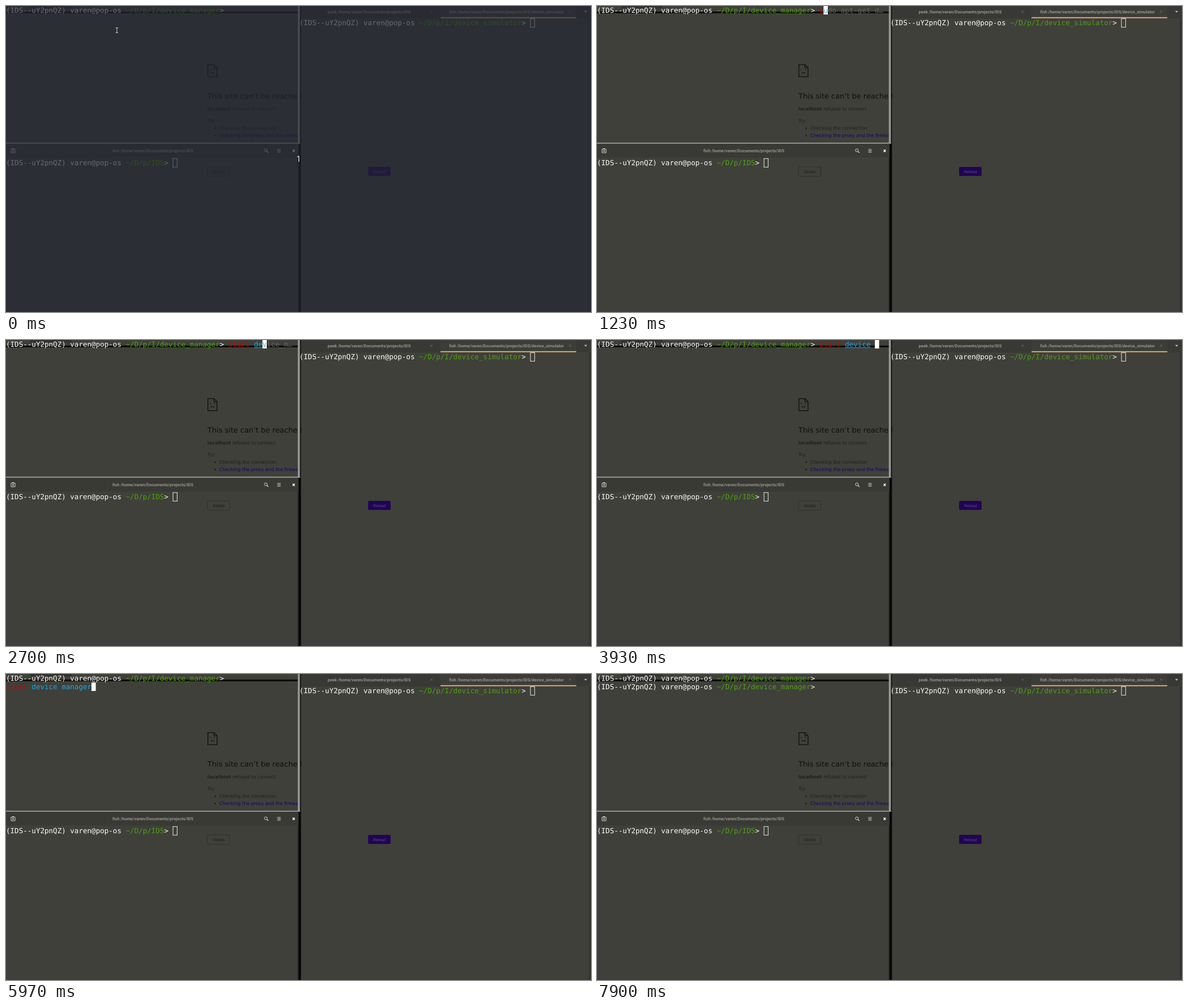
Write an HTML page that moves like this. It is 1034 px wide and 542 px high and loops after 8 s.

```html
<!DOCTYPE html>
<html lang="en">
<head>
<meta charset="utf-8">
<title>Terminals</title>
<style>
  html, body { margin: 0; width: 100%; height: 100%; overflow: hidden; background: #3f403a; }
  svg { display: block; width: 1034px; height: 542px; }
  text { white-space: pre; text-rendering: geometricPrecision; }
  .mono { font: 12.55px "DejaVu Sans Mono", monospace; fill: #fafaf7; }
  .title { font: bold 7.48px Roboto, sans-serif; fill: #95958b; }
  .page { font: 8.14px "DejaVu Sans", sans-serif; fill: #1f1f1c; }
  .button { font: 6.95px "Liberation Sans", sans-serif; }
  .line { fill: none; stroke: #d8d8d2; stroke-width: 1; }
</style>
</head>
<body>
<svg viewBox="0 0 1034 542">
  <defs>
    <clipPath id="paneClip"><rect width="515.5" height="542"/></clipPath>
  </defs>
  <rect width="1034" height="542" fill="#3f403a"/>

  <!-- page showing through the terminals -->
  <rect y="9.8" width="516" height="3.2" fill="#0c0c0b"/>
  <rect x="42" width="74" height="4.5" fill="#32332f"/>
  <g fill="none" stroke="#161614" stroke-width="1.6">
    <path d="M356.8 103.8H367.5L373 109.3V125.2H356.8Z"/>
    <path d="M367.5 103.8V109.3H373" stroke-width="1.3"/>
    <path d="M361.8 119.6Q365 115.8 368.2 119.6" stroke-width="1.3"/>
    <path d="M360.6 111.5V113.2M368.6 111.5V113.2"/>
  </g>
  <text class="page" x="356" y="164" style="font-size:12.95px;fill:#0f0f0d">This site can’t be reached</text>
  <g class="page" clip-path="url(#paneClip)">
    <text x="356" y="185.2"><tspan font-weight="bold">localhost</tspan> refused to connect.</text>
    <text x="356" y="206.2">Try:</text>
    <circle cx="369.5" cy="216.4" r="1.5"/>
    <text x="377" y="219.2">Checking the connection</text>
    <circle cx="369.5" cy="229.4" r="1.5"/>
    <text x="377" y="232.2" fill="#12006a">Checking the proxy and the firewall</text>
  </g>
  <rect x="356" y="285" width="39.6" height="16.6" rx="2" fill="none" stroke="#2c2d29" stroke-width=".8"/>
  <text class="button" x="376" y="296" text-anchor="middle" fill="#1b1b19">Details</text>
  <rect x="640" y="285" width="39.8" height="16" rx="2" fill="#210455"/>
  <text class="button" x="660" y="295.6" text-anchor="middle" fill="#5d4f80">Reload</text>

  <!-- right window -->
  <rect x="521" width="513" height="22" fill="#383934"/>
  <rect x="768" width="240" height="20" fill="#3c3d38"/>
  <rect x="768" y="19.8" width="240" height="1.8" fill="#f3b180"/>
  <rect x="1029.8" y="22" width="4.2" height="520" fill="#353631"/>
  <text class="title" x="568.5" y="12.7">peek /home/varen/Documents/projects/IDS</text>
  <text class="title" x="783.2" y="12.7">fish /home/varen/Documents/projects/IDS/device_simulator</text>
  <path class="line" d="M750.2 8.2l3.8 3.8m0-3.8l-3.8 3.8M995.2 8.2l3.8 3.8m0-3.8l-3.8 3.8" style="stroke:#65665f"/>
  <path d="M1021.8 8.8H1027.2L1024.5 11.8Z" fill="#c4c4bd"/>

  <!-- bottom left window -->
  <rect y="243" width="517" height="25.5" fill="#393a35"/>
  <text class="title" x="188" y="258.7">fish /home/varen/Documents/projects/IDS</text>
  <path d="M9 253.5H16V260H9Z" class="line"/>
  <path d="M12.5 255V258.6M10.7 256.8H14.3M11 252.6H14" class="line"/>
  <circle cx="459.3" cy="255.6" r="2.5" class="line"/>
  <path d="M461.2 257.5L463.8 260.1" class="line" style="stroke-width:1.3"/>
  <path d="M479.5 254H485.5M479.5 256.5H485.5M479.5 259H485.5" class="line"/>
  <path d="M506.6 254.6l3.8 3.8m0-3.8l-3.8 3.8" class="line" style="stroke:#fff;stroke-width:1.4"/>

  <!-- window edges -->
  <rect x="515" y="268" width="2.2" height="274" fill="#2d2e2a"/>
  <rect x="517" y="243" width="4.4" height="299" fill="#080807"/>
  <rect x="519.4" width="2" height="243" fill="#11110f"/>
  <rect x="515.8" width="3.6" height="243" fill="#989894"/>
  <rect y="242.2" width="520" height="1.5" fill="#adada8"/>

  <g id="prompts"></g>
  <g id="shell"></g>

  <g id="veil">
    <rect width="1034" height="542" fill="#222531" fill-opacity=".68"/>
    <text x="517.2" y="275.6" text-anchor="middle" fill="#eee" style="font:15px 'Open Sans',sans-serif">1</text>
  </g>
  <g id="pointer" fill="none">
    <path d="M193.8 38.6H198.2M196 38.6V47.2M193.8 47.2H198.2" stroke="#111" stroke-width="2.2"/>
    <path d="M193.8 38.6H198.2M196 38.6V47.2M193.8 47.2H198.2" stroke="#eee"/>
  </g>
</svg>
<script>
const LOOP = 8000, COL = 7.555, ROW = 15.1;
const WHITE = '#fafaf7', GREEN = '#4fa010', RED = '#cc0000', BLUE = '#1fa6e2', GREY = '#62645e';
const SUDO = 'sudo apt-get d…', PULSE = 'start-pulseaud…', PATH = 'start device_m…';
const HOME = '(IDS--uY2pnQZ) varen@pop-os ';
const DIR = '~/D/p/I/device_manager';
const START = HOME.length + DIR.length + 2;
const $ = id => document.getElementById(id);

// time, typed text, cursor shown, suggested line
const steps = [
  [0, '', 0],
  [600, '', 1],
  [1200, 's', 1],
  [1230, 's', 1, SUDO],
  [1600, 'st', 1, PULSE],
  [1770, 'sta', 1, PULSE],
  [1930, 'star', 1, PULSE],
  [2170, 'start', 1, PULSE],
  [2430, 'start ', 1],
  [2700, 'start de', 1, PATH],
  [3130, 'start dev', 1, PATH],
  [3370, 'start devic', 1, PATH],
  [3430, 'start device', 1, PATH],
  [3930, 'start device ', 1],
  [4300, 'start device m', 1],
  [4400, 'start device ma', 1],
  [4470, 'start device man', 1],
  [4970, 'start device mana', 1],
  [5130, 'start device mana', 0],
  [5530, 'start device mana', 1],
  [5570, 'start device manag', 1],
  [5930, 'start device manage', 1],
  [5970, 'start device manager', 1],
  [6500, 'start device manager', 0],
  [6930, 'start device manager', 1],
  [7470, '', 1],
  [7900, '', 0]
];
const WRAP = 4470, NEXT = 7470;

const run = (str, x, y, fill) =>
  str.trim() ? `<text class="mono" x="${x}" y="${y}" style="fill:${fill}">${str.replace('>', '&gt;')}</text>` : '';

function prompt(dir, x, y) {
  const mid = x + HOME.length * COL;
  return run(HOME, x, y, WHITE) + run(dir, mid, y, GREEN) + run('>', mid + dir.length * COL, y, WHITE);
}

function idle(dir, x, y) {
  const cx = x + (HOME.length + dir.length + 2) * COL;
  return prompt(dir, x, y) +
    `<rect x="${cx + .5}" y="${y - 11.8}" width="7.4" height="15.2" fill="none" stroke="#e6e6e2"/>`;
}

function shell(t, [, typed, cursor, hint = '']) {
  const row = t >= WRAP ? 1 : 0;
  const col = t >= WRAP && t < NEXT ? 0 : START;
  const y = 12 + row * ROW;
  const at = n => (col + n) * COL;
  const end = at(typed.length), rest = hint.slice(typed.length);
  let out = t >= NEXT ? prompt(DIR, 0, y) : '';
  out += run(typed.slice(0, 5), at(0), y, RED) + run(typed.slice(6), at(6), y, BLUE);
  if (t >= 2700 && t < 4300) {
    const w = Math.min(typed.length, 12) - 6;
    out += `<rect x="${at(6)}" y="13" width="${w * COL}" height="1" fill="${BLUE}"/>`;
  }
  if (cursor) out += `<rect x="${end}" y="${row * ROW}" width="${COL}" height="15" fill="#fff"/>`;
  return out + run(rest.slice(0, 1), end, y, '#62b0cc') + run(rest.slice(1), end + COL, y, GREY);
}

$('prompts').innerHTML = prompt(DIR, 0, 12) +
  idle('~/D/p/I/device_simulator', 518.5, 34.2) + idle('~/D/p/IDS', 0, 282);

let last;
function draw(t) {
  const step = steps.findLast(s => s[0] <= t);
  $('veil').style.display = t < 430 ? '' : 'none';
  $('pointer').style.display = t < 1200 ? '' : 'none';
  if (step !== last) $('shell').innerHTML = shell(t, step);
  last = step;
}

const begin = performance.now();
function tick() {
  draw((performance.now() - begin) % LOOP);
  requestAnimationFrame(tick);
}
tick();
</script>
</body>
</html>
```
